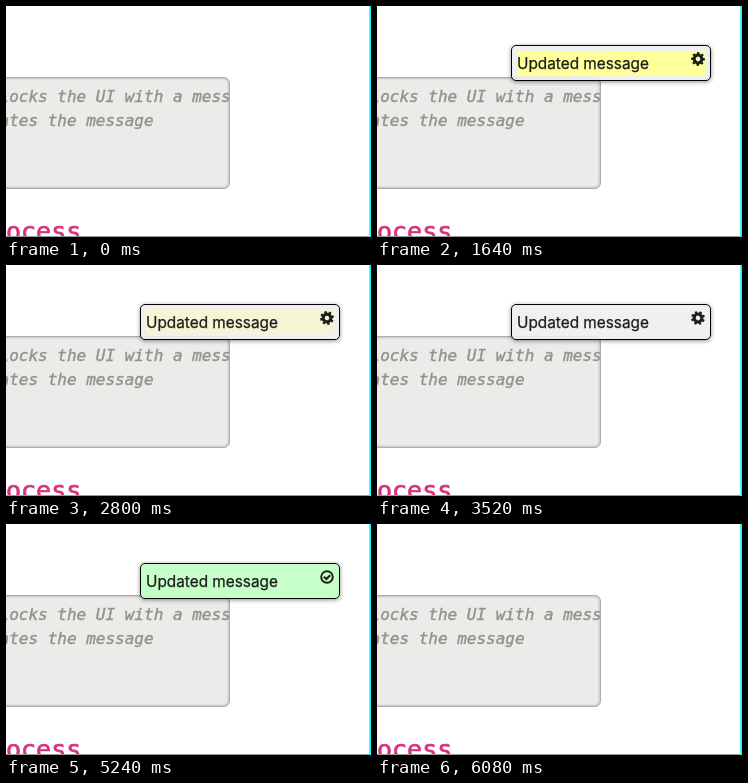
These frames come from a looping animation (365 by 231 pixels, 6360 ms). An HTML page:

```html
<!DOCTYPE html>
<html lang="en">
<head>
<meta charset="utf-8">
<title>Background process message</title>
<style>
  html, body { margin: 0; width: 100%; height: 100%; overflow: hidden; background: #fff; }
  #stage { position: relative; width: 365px; height: 231px; overflow: hidden; }
  #stage > * { position: absolute; box-sizing: border-box; }
  #panel {
    left: -20px; top: 71px; width: 244px; height: 112px; overflow: hidden;
    border: 1px solid #adadad; border-radius: 6px; background: #ebebea;
    box-shadow: inset 0 0 3px rgba(0, 0, 0, .35);
  }
  #panel pre {
    margin: 0; position: absolute; left: 12.5px; top: 7px; color: #929288;
    font: italic 16px/24px "DejaVu Sans Mono", monospace;
    -webkit-text-stroke: .4px;
  }
  #heading {
    left: 0; top: 210px; color: #d6327c; white-space: pre;
    font: 25px/32px "DejaVu Sans Mono", monospace;
    -webkit-text-stroke: .7px;
  }
  #rule { left: 0; top: 230px; width: 363px; height: 1px; background: #999; }
  #edge {
    left: 363px; top: 0; width: 2px; height: 231px;
    background: #00fbff; border-left: 1px solid #48fcff;
  }
  #toast {
    left: 134px; top: 39px; width: 200px; padding: 5px;
    border: 1px solid #000; border-radius: 5px;
    box-shadow: 0 1px 4px rgba(0, 0, 0, .45);
  }
  #message { min-height: 24px; }
  #text {
    position: relative; top: 1px; white-space: pre-line; color: #1c1c1c;
    font: 15.35px/24px Inter, "Liberation Sans", sans-serif;
    -webkit-text-stroke: .25px;
  }
  #toast svg { position: absolute; left: 179px; top: 6px; }
</style>
</head>
<body>
<div id="stage">
  <div id="panel"><pre>locks the UI with a message
ates the message</pre></div>
  <div id="heading">ocess</div>
  <div id="rule"></div>
  <div id="edge"></div>
  <div id="toast">
    <div id="message"><div id="text"></div></div>
    <svg width="14" height="14" viewBox="-7 -7 14 14" fill="none" stroke="#1c1c1c">
      <g id="gear">
        <circle r="3.8" stroke-width="3"/>
      </g>
      <g id="check">
        <circle r="5.8" stroke-width="1.9"/>
        <path d="M-3.1 -.2L-.6 2.1L3.2 -1.7" stroke-width="2.2"/>
      </g>
    </svg>
  </div>
</div>
<script>
  const LOOP = 6360, STEP = 40;
  const UPDATE = 1480, DONE = 4440;
  const GREY = [239, 239, 238], GREEN = [193, 255, 194];
  const [toast, message, label, gear, check] =
    ["toast", "message", "text", "gear", "check"].map(id => document.getElementById(id));

  for (let i = 0; i < 8; i++) {
    const tooth = document.createElementNS("http://www.w3.org/2000/svg", "path");
    tooth.setAttribute("d", "M-1.5 -4.8L-1.1 -6.9H1.1L1.5 -4.8Z");
    tooth.setAttribute("transform", `rotate(${i * 45})`);
    tooth.setAttribute("fill", "#1c1c1c");
    tooth.setAttribute("stroke", "none");
    gear.append(tooth);
  }

  const progress = (t, from, to) => Math.min(1, Math.max(0, (t - from) / (to - from)));
  const swing = (t, from, to) => (1 - Math.cos(Math.PI * progress(t, from, to))) / 2;
  const mix = (a, b, k) => a.map((v, i) => v + (b[i] - v) * k);

  function render(t) {
    const updated = t >= UPDATE, done = t >= DONE;
    const text = updated ? "Updated message" : "This is a background\nProcess";
    if (label.textContent !== text) label.textContent = text;

    const glow = updated ? 1 - swing(t, UPDATE, UPDATE + 2150) : 0;
    message.style.background = `rgba(255,255,153,${glow})`;

    const color = mix(GREY, GREEN, swing(t, DONE, DONE + 840));
    toast.style.background = `rgba(${color.join()},.89)`;
    toast.style.opacity = swing(t, 0, 520) * (1 - swing(t, 5520, 6080));
    toast.style.transform = `translateY(${-8 * progress(t, 5800, 6080)}px)`;

    gear.style.display = done ? "none" : "";
    check.style.display = done ? "" : "none";
    gear.setAttribute("transform", `rotate(${t * 0.18 + 22})`);
  }

  const start = performance.now();
  function frame() {
    const t = (performance.now() - start) % LOOP;
    render(Math.floor(t / STEP) * STEP);
    requestAnimationFrame(frame);
  }
  frame();
</script>
</body>
</html>
```
